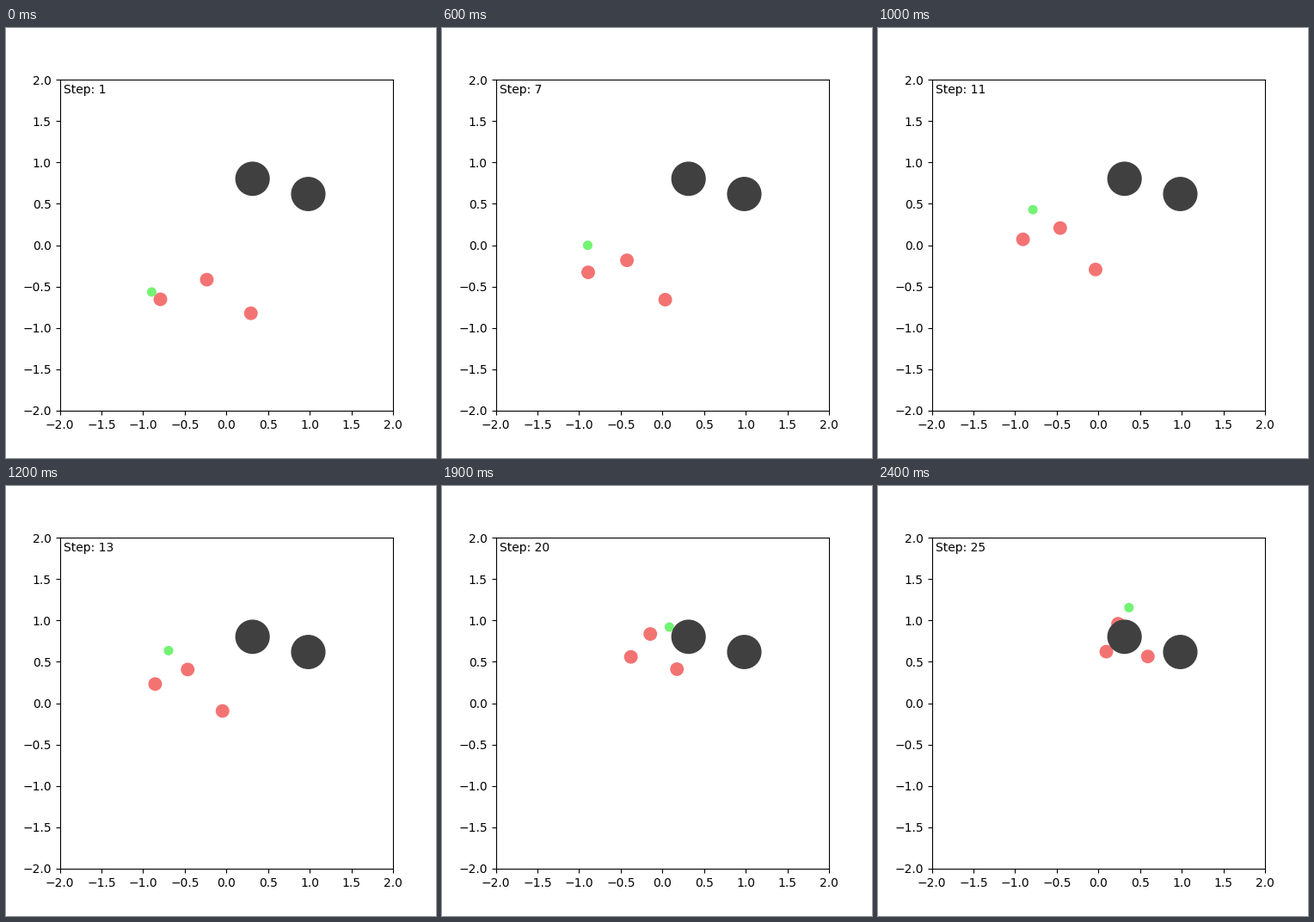
These frames come from a looping animation (500 px wide and 500 px high, 2500 ms). A matplotlib script:

```python
import numpy as np
import matplotlib.pyplot as plt
from matplotlib.animation import FuncAnimation
from matplotlib.patches import Circle

STEPS = 25
DT = 0.1
DAMPING = 0.25
CONTACT_FORCE = 100
CONTACT_MARGIN = 1e-3

RED, GREEN, GREY = [tuple(c / 255 for c in rgb) for rgb in
                    ((243, 115, 115), (115, 243, 115), (64, 64, 64))]

HEADING = {"L": (-1, 0), "R": (1, 0), "U": (0, 1), "D": (0, -1), "N": (0, 0)}
OBSTACLES = np.array([(0.314, 0.802), (0.983, 0.618)])
OBSTACLE_RADIUS = 0.2

CHASER = dict(radius=0.075, accel=3.0, max_speed=1.0, color=RED)
RUNNER = dict(radius=0.05, accel=4.0, max_speed=1.3, color=GREEN)

# kind, start position, one move per step
AGENTS = [
    (CHASER, (-0.792, -0.654), "LUUUUUUUUURUURRRRRRRRRRU"),
    (CHASER, (-0.235, -0.417), "LLUUUUUUUUUUUURRRRRRRRRU"),
    (CHASER, (0.294, -0.823), "LLULUUUUUUUUUUURRRRRRRUU"),
    (RUNNER, (-0.896, -0.566), "UUUUUUUURRUURRRRRRRUUDNR"),
]


def contact(pos, radius):
    """Soft push away from the obstacles."""
    delta = pos - OBSTACLES
    dist = np.linalg.norm(delta, axis=1, keepdims=True)
    gap = dist - radius - OBSTACLE_RADIUS
    depth = np.logaddexp(0, -gap / CONTACT_MARGIN) * CONTACT_MARGIN
    return (CONTACT_FORCE * depth * delta / dist).sum(axis=0)


def simulate(kind, start, moves):
    pos = prev = np.array(start)
    vel = np.zeros(2)
    path = [pos]
    for move in moves:
        force = kind["accel"] * np.array(HEADING[move]) + contact(prev, kind["radius"])
        vel = vel * (1 - DAMPING) + force * DT
        speed = np.linalg.norm(vel)
        if speed > kind["max_speed"]:
            vel = vel * kind["max_speed"] / speed
        prev, pos = pos, pos + vel * DT
        path.append(pos)
    return path


paths = [simulate(*agent) for agent in AGENTS]

fig, ax = plt.subplots(figsize=(5, 5), dpi=100)
ax.set_xlim(-2, 2)
ax.set_ylim(-2, 2)

dots = [ax.add_patch(Circle(start, kind["radius"], color=kind["color"]))
        for kind, start, _ in AGENTS]
for center in OBSTACLES:
    ax.add_patch(Circle(center, OBSTACLE_RADIUS, color=GREY))
counter = ax.text(-1.95, 1.95, "Step: 1", va="top")


def update(i):
    for dot, path in zip(dots, paths):
        dot.center = path[i]
    counter.set_text(f"Step: {i + 1}")
    return [*dots, counter]


anim = FuncAnimation(fig, update, frames=STEPS, interval=100, repeat=True)
plt.show()
```
